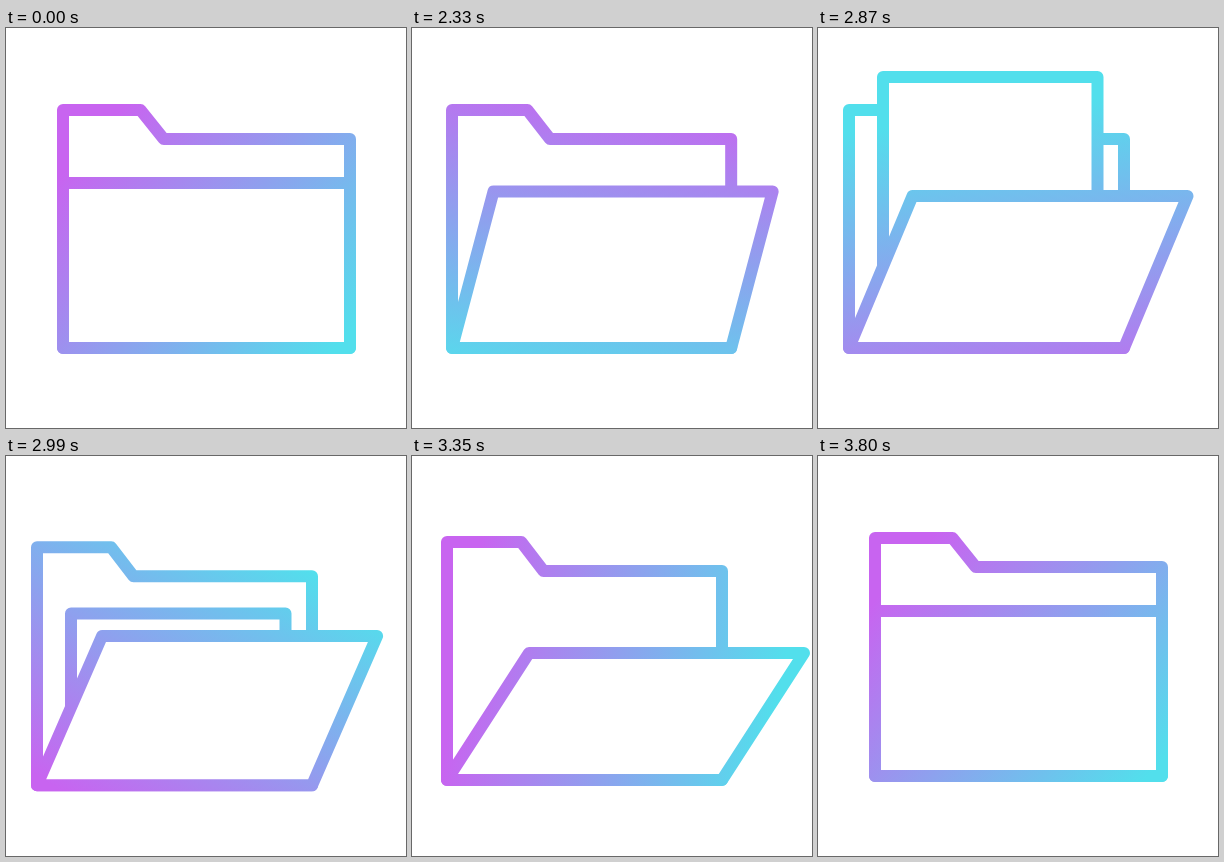
Recreate the animation shown at these times as an HTML page. Size 400 by 400 pixels, loop 3830 ms.

```html
<!DOCTYPE html>
<html lang="en">
<head>
<meta charset="utf-8">
<title>Folder</title>
<style>
  html, body { margin: 0; width: 100%; height: 100%; overflow: hidden; background: #fff; }
  svg { display: block; width: 100%; height: 100%; }
  .line { fill: #fff; stroke: url(#ink); stroke-width: 12; stroke-linejoin: round; }
</style>
</head>
<body>
<svg viewBox="0 0 400 400">
  <defs>
    <linearGradient id="ink" gradientUnits="userSpaceOnUse">
      <stop offset="0" stop-color="#c864f0"/>
      <stop offset="1" stop-color="#52dfec"/>
    </linearGradient>
    <clipPath id="above"><rect id="room" y="-400" width="400"/></clipPath>
  </defs>
  <path id="back" class="line"/>
  <g clip-path="url(#above)"><rect id="paper" class="line" x="65" width="214.5" height="220"/></g>
  <path id="flap" class="line"/>
</svg>
<script>
const LOOP = 3830, START = 2030, STEP = 30;
const BASE = 320, PAPER_HEIGHT = 220, HALF_GRADIENT = 160;

// Each track lists [time, value] pairs.
const tracks = {
  left:   [[1995, 57], [2550, 31], [3200, 31], [3350, 35], [3620, 51], [3780, 57]],
  width:  [[1995, 287], [2550, 275], [3350, 275], [3620, 283], [3780, 287]],
  drop:   [[2910, 0], [3080, 23], [3120, 24.5], [3350, 4], [3500, -5], [3620, -3], [3760, 0]],
  lean:   [[1995, 0], [2550, 63.5], [2910, 63.5], [3140, 72], [3350, 82], [3620, 20], [3780, 0]],
  height: [[1995, 165], [2550, 152], [2910, 152], [3140, 139], [3350, 127], [3620, 159], [3780, 165]],
  angle:  [[2000, 42], [2600, 180], [2870, 262], [3140, 343], [3350, 370], [3780, 402]],
  inkX:   [[2000, 208], [2600, 262], [2870, 215], [3140, 203], [3780, 208]],
  inkY:   [[2000, 216], [2600, 232], [2870, 240], [3350, 242], [3780, 216]]
};

const $ = id => document.getElementById(id);

function slope(keys, i) {
  const a = keys[i], b = keys[i + 1];
  return a && b ? (b[1] - a[1]) / (b[0] - a[0]) : 0;
}

function tangent(keys, i) {
  const before = slope(keys, i - 1), after = slope(keys, i);
  return before * after > 0 ? 2 * before * after / (before + after) : 0;
}

// Smooth interpolation that never overshoots its keys.
function sample(keys, t) {
  const last = keys.length - 1;
  if (t <= keys[0][0]) return keys[0][1];
  if (t >= keys[last][0]) return keys[last][1];
  const i = keys.findIndex(key => key[0] > t) - 1;
  const [t0, v0] = keys[i], [t1, v1] = keys[i + 1];
  const span = t1 - t0, u = (t - t0) / span, w = 1 - u;
  return v0 * w * w * (1 + 2 * u) + v1 * u * u * (1 + 2 * w)
    + span * u * w * (tangent(keys, i) * w - tangent(keys, i + 1) * u);
}

function set(id, attrs) {
  for (const name in attrs) $(id).setAttribute(name, attrs[name]);
}

const outline = points => "M" + points.map(p => p.join(" ")).join("L") + "Z";

function draw(t) {
  const s = {};
  for (const name in tracks) s[name] = sample(tracks[name], t);

  const { left, lean, drop } = s;
  const right = left + s.width, base = BASE + drop, rim = base - s.height;
  const tab = s.width * 0.27, notch = s.width * 0.351;

  set("back", { d: outline([
    [left, 82 + drop], [left + tab, 82 + drop], [left + notch, 111 + drop],
    [right, 111 + drop], [right, base], [left, base]
  ]) });
  set("flap", { d: outline([
    [left, base], [left + lean, rim], [right + lean, rim], [right, base]
  ]) });

  const paperY = 49 + (t - 2870) * (PAPER_HEIGHT + 24) / 270;
  set("paper", { y: paperY, visibility: t > 2500 && paperY < base ? "visible" : "hidden" });
  set("room", { height: 400 + base });

  const turn = s.angle * Math.PI / 180;
  const dx = HALF_GRADIENT * Math.cos(turn), dy = HALF_GRADIENT * Math.sin(turn);
  set("ink", { x1: s.inkX - dx, y1: s.inkY - dy, x2: s.inkX + dx, y2: s.inkY + dy });
}

const origin = performance.now();

function tick() {
  const t = (performance.now() - origin) % LOOP;
  draw(t < START ? 0 : START + Math.floor((t - START) / STEP) * STEP);
  requestAnimationFrame(tick);
}
tick();
</script>
</body>
</html>
```
